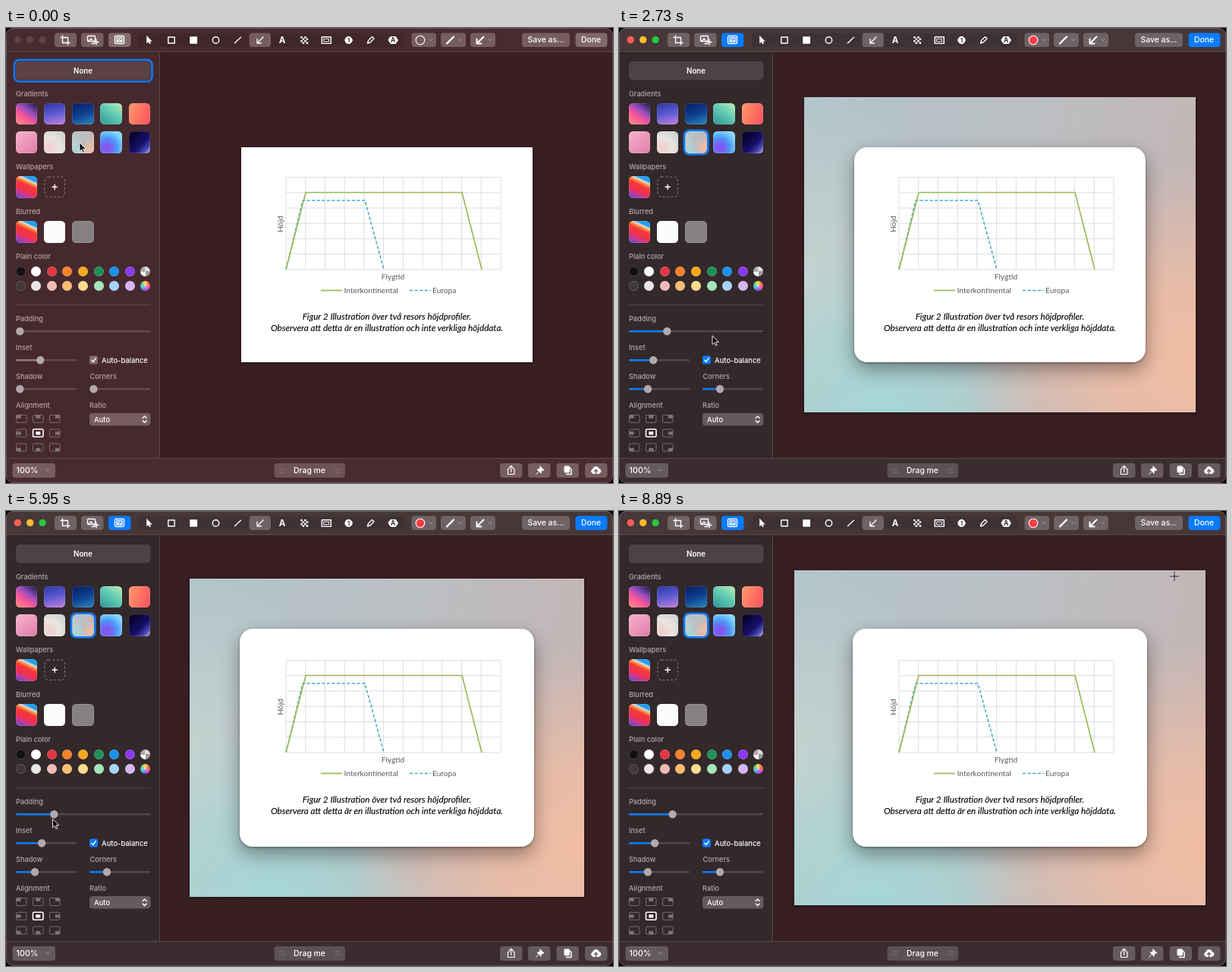
An HTML page for the animation above (8960 ms loop, 800 px wide and 599 px high).

```html
<!DOCTYPE html>
<html lang="sv">
<head>
<meta charset="utf-8">
<title>Image background editor</title>
<style>
html, body { margin: 0; width: 100%; height: 100%; overflow: hidden; background: #000; }
#app {
  --panel: #33282a; --bar: #3b2c2f; --top: #463739; --button: #675a5d; --tool: #706366; --field: #4d4245;
  --accent: #0a7bff; --fill: #0a7bff; --muted: #b3aaab; --shade: 0; --round: 0;
  position: absolute; left: 0; top: 0; width: 800px; height: 599px; overflow: hidden;
  border-radius: 9px; background: #391e22; font-family: Inter, sans-serif;
}
#app.idle {
  --panel: #46292e; --bar: #472b30; --top: #472b30; --button: #765d61; --tool: #765d61; --field: #5a4146;
  --accent: #806a6e; --fill: #8c777a; --muted: #b7a3a6;
}
#app.picked { --shade: 1; --round: 17; }
#app > *, #swatches > * { position: absolute; box-sizing: border-box; }
svg { left: 0; top: 0; width: 800px; height: 599px; }
#backdrop, .mist {
  background:
    radial-gradient(60% 62% at 100% 84%, #f1bda3 0, #efbda5cc 40%, #efbda500 100%),
    radial-gradient(42% 55% at 20% 100%, #a6d6d7 0, #a9d4d4bb 45%, #a9d4d400 100%),
    radial-gradient(45% 60% at 0 60%, #c6d3cf 0, #c6d3cf00 100%),
    linear-gradient(100deg, #b1c5cb, #bbbfc3 50%, #c5b4b3);
}
#backdrop {
  --grow: calc(var(--inset) + var(--pad));
  left: calc((310 - var(--grow)) * 1px); top: calc((157 - var(--grow)) * 1px);
  width: calc((384 + 2 * var(--grow)) * 1px); height: calc((283 + 2 * var(--grow)) * 1px);
  box-shadow: 0 1px 4px #0008; visibility: hidden;
}
.picked #backdrop { visibility: visible; }
#card {
  left: calc((310 - var(--inset)) * 1px); top: calc((157 - var(--inset)) * 1px);
  width: calc((384 + 2 * var(--inset)) * 1px); height: calc((283 + 2 * var(--inset)) * 1px);
  background: #fff; border-radius: calc(var(--round) * 1px);
  box-shadow: 0 1px 3px #0006, 0 10px 24px rgba(20, 10, 12, calc(var(--shade) * .4));
}
.tile { width: 28.5px; height: 28.5px; border-radius: 5.5px; box-shadow: inset 0 0 0 .7px #ffffff28; }
.dot { width: 13px; height: 13px; border-radius: 50%; box-shadow: inset 0 0 0 .7px #ffffff38; }
.ring { fill: none; stroke: var(--accent); stroke-width: 2.6; }
#pickRing, .picked #noneRing { visibility: hidden; }
.picked #pickRing { visibility: visible; }
.idle .ring { stroke: #0a7bff; }
.bar { fill: var(--bar); }
.top { fill: var(--top); }
.tool { fill: var(--tool); }
.btn { fill: var(--button); }
.hot { fill: var(--accent); }
.track { fill: #ffffff26; }
.done { fill: var(--fill); }
.knob { fill: #b3a9ab; }
.label { font-size: 9.2px; font-weight: 500; fill: var(--muted); }
.white { fill: #fff; }
.mid { text-anchor: middle; }
.icon { fill: none; stroke: #fff; stroke-width: 1.4; stroke-linecap: round; stroke-linejoin: round; }
.dim { stroke: #aaa0a2; stroke-width: 1; }
.light { stroke: #0003; stroke-width: .5; }
.idle .light { fill: #5d4448; }
#ink { fill: #ff3b45; }
.idle #ink { fill: none; }
.chart { font: 10.2px Lato, sans-serif; fill: #595959; }
.caption { font: italic 11.72px Lato, sans-serif; fill: #000; stroke: #000; stroke-width: .1; }
#pointer, #cross { transform: translate(calc(var(--x) * 1px), calc(var(--y) * 1px)); }
#cross { display: none; }
.overCanvas #cross { display: inline; }
.overCanvas #pointer { display: none; }
</style>
</head>
<body>
<div id="app" class="idle">
  <div id="backdrop"></div>
  <div id="card"></div>

  <svg viewBox="0 0 800 599">
    <g class="chart">
      <path id="grid" fill="none" stroke="#dadada" stroke-width=".9"/>
      <path d="M369 318L391 227H473L498 318" fill="none" stroke="#4bacc6" stroke-width="1.6" stroke-dasharray="4.2 2.4"/>
      <path d="M369 318L395 216.5H601L627 318" fill="none" stroke="#9bbb59" stroke-width="1.7"/>
      <path d="M415 345.5H443" stroke="#9bbb59" stroke-width="1.8"/>
      <path d="M532 345.5H560" stroke="#4bacc6" stroke-width="1.6" stroke-dasharray="4.2 2.4"/>
      <text x="445.500" y="349">Interkontinental</text>
      <text x="562" y="349">Europa</text>
      <text x="510" y="330.500" class="mid">Flygtid</text>
      <text class="mid" transform="translate(364.500 258) rotate(-90)">Höjd</text>
    </g>
    <g class="caption mid">
      <text x="502" y="384">Figur 2 Illustration över två resors höjdprofiler.</text>
      <text x="502" y="398.500">Observera att detta är en illustration och inte verkliga höjddata.</text>
    </g>

    <rect y="31" width="203" height="536" fill="var(--panel)"/>
    <path class="top" d="M0 0H800V31H0Z"/>
    <path class="bar" d="M0 567H800V599H0Z"/>
    <path d="M0 31.500H800M0 566.500H800M202.500 32V566" stroke="#5a484b" fill="none"/>
    <path d="M0 32.500H800M203.500 32V566" stroke="#1d1012" stroke-opacity=".5" fill="none"/>

    <g id="lights"></g>
    <rect x="174" y="7" width="351" height="18" rx="4" fill="#00000018"/>
    <g id="buttons"></g>

    <g class="icon">
      <path d="M74.500 10V19.500H84M72 12.500H81.500V22"/>
      <rect x="107.500" y="10.500" width="10" height="7" rx="1"/>
      <path d="M109 17l3-3 2 2M113 20.500h4M119 15v7M116 18.500h6"/>
      <rect x="143.500" y="10.500" width="12" height="10" rx="1.500"/>
      <rect x="146" y="13" width="7" height="5"/>
      <path d="M147 17l2-2 3 2"/>
      <path d="M185.500 10.500V20l2.300-2 1.500 3 1.300-.7-1.400-2.900H192Z" fill="#fff" stroke-width=".5"/>
      <rect x="213.800" y="12" width="8.400" height="8"/>
      <rect x="243" y="12" width="8.400" height="8" fill="#fff"/>
      <circle cx="276.500" cy="16" r="4.200"/>
      <path d="M301.500 19.800L309.500 12.200"/>
      <path d="M339 12L331 20M331 14.500V20H336.500"/>
      <rect x="416.300" y="11.800" width="12" height="8.600"/>
      <rect x="419" y="14.300" width="6.600" height="3.600" stroke-width="1"/>
      <path d="M476.500 20l1-3.500 5-5 2.500 2.500-5 5Z"/>
      <path d="M507 11.500h6.500l3 4.500-3 4.500H507l-3-4.500Z" fill="#fff" stroke-width="1"/>
      <circle cx="451.500" cy="16" r="4.700" fill="#fff" stroke-width=".8"/>
      <circle id="ink" cx="546" cy="16" r="5.800" stroke-width="1.100"/>
      <path d="M581 20.500L590 11.500" stroke-width="2.300"/>
      <path d="M629.500 11.500L620.500 20.500M620.500 14.500v6h6" stroke-width="2"/>
      <path class="dim" d="M558 14.800l2 2 2-2M597 14.800l2 2 2-2M636 14.800l2 2 2-2M52.500 581l2.200 2.200 2.200-2.200"/>
      <path class="dim" d="M360 579.500h8M360 582.500h8M360 585.500h8M433 579.500h8M433 582.500h8M433 585.500h8" opacity=".3"/>
      <path d="M663 580.500h-1.500v7h8.500v-7h-1.500M665.700 584.500v-8M663 579l2.700-2.700 2.700 2.700" stroke-width="1.200"/>
      <path d="M704 577l5 5-2 .3-2 2 .2 2-5.200-5 2-.4 2-2ZM701.500 584.500l-3 3" fill="#fff" stroke-width="1"/>
      <rect x="736" y="577" width="6.500" height="8" rx="1" fill="#fff" stroke-width="1"/>
      <path d="M738.500 587.500h6.500v-6.500l-2-2" stroke-width="1.500"/>
      <path d="M774 586.500a3 3 0 01-.3-5.800 4 4 0 017.700-.4 3.200 3.200 0 01.2 6.200Z" fill="#fff" stroke-width="1"/>
      <path d="M777.500 587v-5M775.500 583.500l2-2 2 2" style="stroke:var(--button)"/>
    </g>
    <path id="pixels" class="white"/>
    <g class="mid white" font-weight="700">
      <text x="364" y="20" font-size="11.500">A</text>
      <text x="451.500" y="18.800" font-size="7.500" style="fill:var(--bar)">1</text>
      <text x="510.300" y="19.200" font-size="8.500" style="fill:var(--bar)">A</text>
    </g>

    <rect x="13" y="44" width="177.500" height="24.500" rx="5" fill="var(--field)"/>
    <rect id="noneRing" class="ring" x="11" y="42" width="181.500" height="28.500" rx="6.500"/>
    <g class="mid white" font-weight="500" font-size="10.400">
      <text x="101.500" y="59.700" font-size="9.700" font-weight="600">None</text>
      <text x="711.500" y="19.300">Save as...</text>
      <text x="771" y="19.300">Done</text>
      <text x="400" y="585.800">Drag me</text>
      <text x="28" y="586.300" font-size="10.700">100%</text>
    </g>
    <g id="labels" class="label"></g>
    <rect x="51" y="196" width="26.500" height="26.500" rx="5" fill="none" stroke="#857a7c" stroke-dasharray="3 2.500"/>
    <path class="icon" d="M61 209.300h6.400M64.200 206.100v6.400" stroke-width="1.200"/>
    <path d="M13 364.500H190.500" stroke="#ffffff24"/>

    <g id="sliders"></g>
    <rect class="hot" x="110" y="431.500" width="11" height="11" rx="2.500"/>
    <path class="icon" d="M112.800 437.300l2 2.300 3.400-5"/>
    <rect class="btn" x="110" y="507" width="80.500" height="16.500" rx="4"/>
    <path class="icon" d="M180.200 513.500l2.500-2.500 2.500 2.500M180.200 517l2.500 2.500 2.500-2.500" stroke-width="1.200"/>
    <g class="white" font-size="9.400" font-weight="500">
      <text x="126" y="440.800">Auto-balance</text>
      <text x="116" y="518.600">Auto</text>
    </g>
    <g id="align"></g>
  </svg>

  <div id="swatches"></div>

  <svg viewBox="0 0 800 599">
    <rect id="pickRing" class="ring" x="86" y="134.800" width="31.500" height="31.500" rx="6.500"/>
    <rect x=".5" y=".5" width="799" height="598" rx="9" fill="none" stroke="#ffffff2e"/>
    <path id="pointer" d="M0 0V11.500L2.700 9 4.500 13.200 6.400 12.400 4.600 8.400H8.300Z" fill="#000" stroke="#fff" stroke-width=".9"/>
    <g id="cross" fill="none">
      <path d="M-7 0H7M0-7V7" stroke="#fff" stroke-opacity=".45" stroke-width="2.400"/>
      <path d="M-6.500 0H6.500M0-6.500V6.500" stroke="#111" stroke-width="1"/>
    </g>
  </svg>
</div>

<script>
const $ = id => document.getElementById(id);
const app = $('app');

function rect(x, y, w, h, cls, extra = '') {
  return `<rect x="${x}" y="${y}" width="${w}" height="${h}" class="${cls}" ${extra}/>`;
}

// Chart grid and pixelate icon
let grid = '';
for (let i = 0; i <= 11; i++) grid += `M${369 + i * 25.73} 196.500V318`;
for (let i = 0; i <= 6; i++) grid += `M369 ${196.5 + i * 20.25}H652`;
$('grid').setAttribute('d', grid);
let pixels = '';
for (let i = 0; i < 16; i++) {
  const col = i % 4, row = i >> 2;
  if ((col + row) % 2 === 0) pixels += `M${388.2 + col * 2.5} ${11 + row * 2.5}h2.500v2.500h-2.500z`;
}
$('pixels').setAttribute('d', pixels);

$('lights').innerHTML = ['#ff5f57', '#febc2e', '#28c840'].map((color, i) =>
  `<circle class="light" cx="${15.3 + i * 16.4}" cy="15.500" r="4.800" fill="${color}"/>`).join('');

$('buttons').innerHTML = [
  [64, 29], [99, 29.5], [135, 29.5, 'hot'], [320.5, 28.5], [534.5, 32.5], [573, 33], [612, 33],
  [680, 63], [750.5, 42, 'hot']
].map(([x, w, cls = 'tool']) => rect(x, 6.5, w, 18.5, cls, 'rx="4"')).join('') + [
  [8.5, 56.5], [353.5, 93.5], [651, 29.5], [688, 29.5], [725.5, 29.5], [763, 29.5]
].map(([x, w], i) => rect(x, 573, w, 19, 'btn', `rx="4" opacity="${i === 1 ? .8 : 1}"`)).join('');

$('labels').innerHTML = [
  ['Gradients', 13, 90], ['Wallpapers', 13, 186], ['Blurred', 13, 245.3], ['Plain color', 13, 304.3],
  ['Padding', 13, 386], ['Inset', 13, 424.2], ['Shadow', 13, 462.2], ['Corners', 110.5, 462.2],
  ['Alignment', 13, 500.2], ['Ratio', 110, 500.2]
].map(([text, x, y]) => `<text x="${x}" y="${y}">${text}</text>`).join('');

// Sliders
const sliders = [[13, 399.3, 177], [13, 437.3, 80], [13, 475.3, 80], [110, 475.3, 80]];
$('sliders').innerHTML = sliders.map(([x, y, w]) =>
  rect(x, y - 1.2, w, 2.4, 'track', 'rx="1.2"') + rect(x, y - 1.2, 5, 2.4, 'done', 'rx="1.2"') +
  `<circle class="knob" cx="${x + 5}" cy="${y}" r="5.200"/>`).join('');
const fills = [...document.querySelectorAll('.done')];
const knobs = [...document.querySelectorAll('.knob')];

// Alignment picker
let cells = '';
for (let i = 0; i < 9; i++) {
  const col = i % 3, row = Math.floor(i / 3), on = i === 4;
  const x = 13.5 + col * 22, y = 509.5 + row * 18.8;
  const color = on ? '#fff' : '#807477';
  cells += rect(x, y, 13.5, 10, '', `rx="1.500" fill="none" stroke="${color}" stroke-width="${on ? 1.6 : .9}"`);
  cells += rect(x + col * 3.6 + .2, y + row * 2.8 + .2, 6, 4.2, '', `fill="${color}"`);
}
$('align').innerHTML = cells;

// Swatches
const sunset = 'linear-gradient(205deg, #219ff0 20%, #e9dcd8 25%, #f59a4c 32%, #f53a36 42%, #f2304d 62%, #c23a9a 78%, #4d50d8)';
const gradients = [
  'linear-gradient(215deg, #2b245c 8%, #9a4fc0 38%, #fa5596 62%, #f98f86)',
  'linear-gradient(165deg, #2936a0, #5e5bd2 50%, #c583da)',
  'linear-gradient(160deg, #0a1c60, #0e3f8e 50%, #2d86bf)',
  'linear-gradient(215deg, #bdebb4, #62ccb2 45%, #2e9397)',
  'linear-gradient(110deg, #ff9b6c, #fd7463 50%, #f9505f)',
  'linear-gradient(140deg, #f4b4cd, #eb94b9 55%, #dc7cab)',
  'radial-gradient(circle at 25% 75%, #f1cdca, #e8e4e1 45%, #c3cdca)',
  '',
  'radial-gradient(circle at 30% 75%, #8159f2 15%, #4d96f8 45%, #7bd4fb 75%, #a8e4fb)',
  'linear-gradient(135deg, #080430 20%, #17106a 60%, #4a49b5 82%, #c6cdf5)'
];
const swatch = (cls, x, y, fill) =>
  `<div class="${cls}" style="left:${x}px;top:${y}px;${fill ? 'background:' + fill : ''}"></div>`;
const tile = (col, y, fill) => swatch(fill ? 'tile' : 'tile mist', 12.7 + col * 37.25, y, fill);
const colors = [
  '#111', '#fff', '#e23742', '#f5822b', '#f7a71c', '#1d9158', '#1b90ea', '#8a39f0',
  'conic-gradient(#ddd 25%, #999 0 50%, #fff 0 75%, #aaa 0)',
  '#3f3838', '#e8e5e5', '#f2bab6', '#fcbc71', '#fbdc8d', '#a5e5ba', '#a6d3fb', '#d6b4f5',
  'radial-gradient(#fff8, #fff0 60%), conic-gradient(#f5d33c, #ff5a3c, #f23ca8, #7a4cf5, #35b8f5, #4fd864, #f5d33c)'
];
$('swatches').innerHTML =
  gradients.map((g, i) => tile(i % 5, i < 5 ? 98.9 : 136.2, g)).join('') +
  tile(0, 195, sunset) + tile(0, 254, sunset) + tile(1, 254, '#fcfbfb') + tile(2, 254, '#858183') +
  colors.map((c, i) => swatch('dot', 12.8 + i % 9 * 20.55, i < 9 ? 313.5 : 332.7, c)).join('');

// Motion: rows of time followed by values
const LOOP = 8960, FOCUS = 420, PICK = 1190;
const path = [
  [0, 97, 151], [250, 97, 151], [700, 105, 153], [1600, 105, 153], [2450, 122, 401], [2730, 123, 405],
  [3350, 47, 434], [3650, 47, 434], [3850, 49, 434], [4420, 62, 434], [4830, 48, 434], [5350, 48, 434],
  [6150, 64, 400], [6400, 64, 400], [6790, 67, 401], [7400, 71, 401], [7800, 71, 401], [8600, 732, 86]
];
const insets = [[3600, 0], [3850, 1.5], [4500, 16], [4830, 13.5], [5250, 2.2]];
const pads = [[6400, 65.7], [6790, 70], [7400, 76.4]];

function at(rows, t) {
  const next = rows.findIndex(row => row[0] > t);
  if (next < 0) return rows[rows.length - 1].slice(1);
  if (next === 0) return rows[0].slice(1);
  const a = rows[next - 1], b = rows[next];
  const u = (t - a[0]) / (b[0] - a[0]), ease = u * u * (3 - 2 * u);
  return a.slice(1).map((v, i) => v + (b[i + 1] - v) * ease);
}

function draw(now) {
  const t = Math.floor(now % LOOP / 70) * 70;
  const picked = t >= PICK;
  const [x, y] = at(path, t), [inset] = at(insets, t);
  const pad = picked ? at(pads, t)[0] : 0;
  app.classList.toggle('idle', t < FOCUS);
  app.classList.toggle('picked', picked);
  app.classList.toggle('overCanvas', x > 203);
  Object.entries({ x, y, inset, pad }).forEach(([name, v]) => app.style.setProperty('--' + name, v));
  [18.3 + pad * .685, 45.2 + inset * .88, picked ? 38 : 18.3, picked ? 133 : 115.5].forEach((pos, i) => {
    knobs[i].setAttribute('cx', pos);
    fills[i].setAttribute('width', i !== 1 && !picked ? 0 : pos - sliders[i][0]);
  });
}

const start = performance.now();
function tick() {
  draw(performance.now() - start);
  requestAnimationFrame(tick);
}
tick();
</script>
</body>
</html>
```
